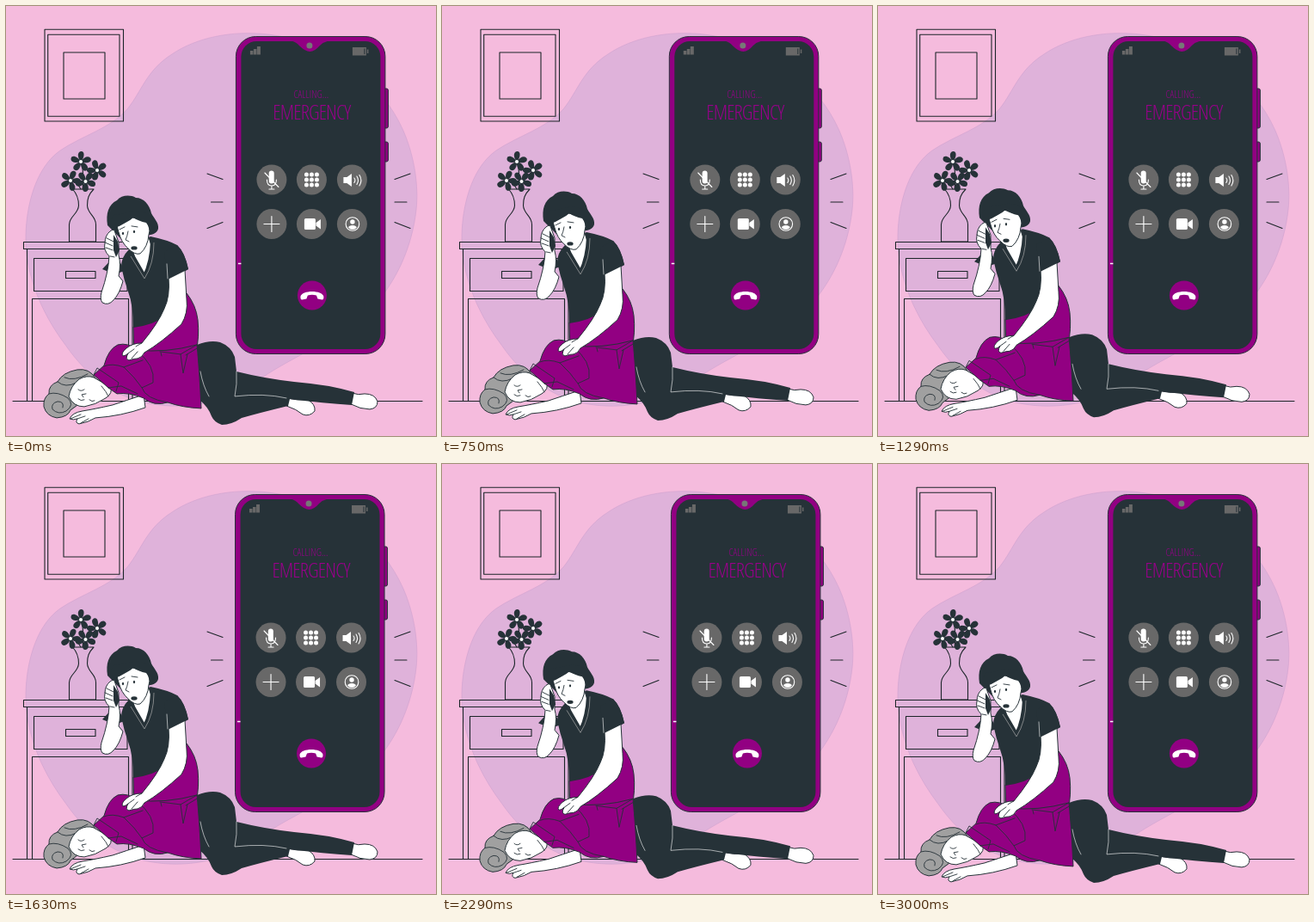
Recreate the animation shown at these times as an HTML page. Size 500x500 px, loop 3.04 s.

```html
<!DOCTYPE html>
<html lang="en">
<head>
<meta charset="utf-8">
<title>Emergency call</title>
<style>
html, body { margin: 0; width: 100%; height: 100%; overflow: hidden; background: #f5bbdd; }
svg { display: block; width: 100%; height: 100%; }
.line { fill: none; stroke: #1c2529; stroke-width: 1.1; stroke-linecap: round; stroke-linejoin: round; }
.dark { fill: #263238; }
.pink { fill: #920082; }
.grey { fill: #686868; }
.skin { fill: #fff; stroke: #263238; stroke-width: 1; stroke-linejoin: round; }
.edge { stroke: #263238; stroke-width: 1; stroke-linejoin: round; }
.fold { fill: none; stroke: #263238; stroke-width: .9; stroke-linecap: round; stroke-linejoin: round; }
.shine { fill: none; stroke: #fff; stroke-width: .6; stroke-linecap: round; }
.icon { fill: none; stroke: #fff; stroke-width: 1.1; stroke-linecap: round; }
.white { fill: #fff; }
text { fill: #98008a; font-family: "Open Sans", "Noto Sans", sans-serif; font-weight: 300; font-stretch: 75%; text-anchor: middle; }
</style>
</head>
<body>
<svg viewBox="0 0 500 500">
  <path fill="#dfb2da" stroke="#cfa2cf" stroke-width=".6" d="M23 266C24 228 36 187 63 168C88 151 122 142 141 120C158 99 163 75 193 56C221 37 262 28 305 33C380 42 438 90 462 145C475 175 480 209 477 237C472 282 453 320 430 346C395 383 345 402 304 428C272 452 235 467 190 465C137 463 98 436 69 394C39 354 22 309 23 266Z"/>

  <g class="line">
    <path d="M45 27.300H136.500V134H45ZM48.700 33.300H132V128.300H48.700ZM67 54H115V108H67Z"/>
    <path d="M20.500 274.500H147V282.500H20.500ZM24.500 282.500V459M30.500 340.500V459M30.500 340.500H142.500V459M147 282V459M32.500 293.500H141V331.500H32.500ZM69.500 308.500H104V316.500H69.500Z"/>
    <path d="M8 459.500H484"/>
    <path d="M77.500 213H102C96 219 94.500 224 94.500 232C95 242 104.500 244 104.500 254V274H73.500V254C74 244 84 242 84.500 232C84.500 224 83 219 77.500 213Z"/>
    <path d="M88 183Q91 198 89 213M106 192Q94 201 91 213M75 203Q84 206 87 213"/>
    <path d="M234 195L252 201.500M238.500 228H252M234 258.500L252 251.500M452 201.500L470 195M452 228H466M452 251.500L470 258.500"/>
  </g>
  <g id="flowers"></g>

  <g id="phone">
    <rect class="pink edge" x="438" y="96" width="6.500" height="46" rx="2"/>
    <rect class="pink edge" x="438" y="158" width="6.500" height="23" rx="2"/>
    <rect class="pink edge" x="267.500" y="35.500" width="173.500" height="369" rx="23"/>
    <rect class="dark" x="273.500" y="41" width="162" height="358" rx="18"/>
    <path class="pink" d="M332 40.500Q338 42 341 46Q348 53 353.500 53Q359 53 365 46Q369 42 375 40.500Z"/>
    <circle cx="353" cy="46" r="3.500" fill="#777"/>
    <path class="grey" d="M284 52h3.500v4.500h-3.500zM288 50h3.500v6.500h-3.500zM292 47h4v9.500h-4zM403 48h16v9.500h-16zM420 50.500h1.500v4.500h-1.500z"/>
    <path d="M417 49.500V56" stroke="#263238"/>
    <path d="M270 299.500H273.500" stroke="#fff" stroke-width="1.500"/>
    <text x="355" y="106.500" font-size="11.800" letter-spacing=".1">CALLING...</text>
    <text x="355.500" y="131.800" font-size="24" letter-spacing="-.85">EMERGENCY</text>
    <g id="buttons" class="grey"></g>

    <rect class="white" x="305.800" y="191.500" width="6" height="15" rx="3"/>
    <path class="icon" d="M303.500 202Q303.500 209 309 209Q314.500 209 314.500 202M309 209V213M306 213H312"/>
    <path class="icon" d="M301 194L317 210.500" stroke-width=".8"/>
    <g id="keypad" class="white"></g>
    <path class="white" d="M392.500 199H396.500L402 195V210L396.500 206H392.500Z"/>
    <path class="icon" d="M405 200Q407 202.500 405 205.500M408 198Q411 202.500 408 207.500M411 196.500Q415 202.500 411 209"/>
    <path class="icon" d="M300 253.500H318M309 244.500V262.500"/>
    <rect class="white" x="347" y="247" width="13" height="13" rx="1.500"/>
    <path class="white" d="M360.500 252L366 248V259.500L360.500 255.500Z"/>
    <circle class="icon" cx="403" cy="253.500" r="7.800"/>
    <circle class="white" cx="403" cy="251" r="2.700"/>
    <path class="white" d="M398 257.500Q399 255 403 255Q407 255 408 257.500Q406 260 403 260Q400 260 398 257.500Z"/>
    <circle class="pink" cx="356" cy="336.500" r="17"/>
    <path class="white" d="M342.500 338C344 330 368 330 369.500 338Q369.500 342 367.500 341.500L362.500 340.500Q361.500 337.500 361 336.500Q356 335 351 336.500Q350.500 337.500 349.500 340.500L344.500 341.500Q342.500 342 342.500 338Z"/>
  </g>

  <g id="people">
    <!-- kneeling caller -->
    <path class="pink edge" d="M148 373Q178 368 210 334Q221 348 223 365Q225 385 221 402L224 455L150 440Z"/>
    <path class="dark" d="M118 255C116 241 119 231 129 226C134 220 144 219 151 223C160 223 167 231 169 241C172 247 178 252 177 259C175 266 167 267 158 266L133 270Z"/>
    <path class="dark" d="M128 289L112 306L126 312L138 308Z"/>
    <path class="dark" d="M143 283Q134 292 134 303Q137 318 142 332Q148 348 148 374Q172 371 190 358Q204 349 210 335Q202 324 200 313L212 306Q208 286 199 278Q188 272 168 268Z"/>
    <path class="skin" d="M146 283Q151 291 148 294L161 313Q169 296 170 282L165 266L149 276Z"/>
    <path d="M146 288L161 314Q169 298 170 274" fill="none" stroke="#263238" stroke-width="4"/>
    <path d="M145 291L161 317Q172 300 172 275" fill="none" stroke="#aaa" stroke-width=".7"/>
    <path class="skin" d="M129 256L147 246L164 250Q169 257 166 266Q165 280 156 288Q150 290 142 282Q134 275 131 263Z"/>
    <path class="dark" d="M124 259Q133 256 139 252Q145 249 148 246Q154 250 163 252Q167 257 167 266Q177 261 174 251Q164 236 147 239L126 243L118 253Z"/>
    <path class="fold" d="M142 262Q141 268 139 272L143 274M132 260L138 257M146 256L153 257"/>
    <ellipse class="dark" cx="136" cy="264.500" rx="1.100" ry="1.700"/>
    <ellipse class="dark" cx="149" cy="262.500" rx="1.100" ry="1.700"/>
    <ellipse class="dark" cx="149" cy="281.500" rx="3.600" ry="2.200"/>
    <path class="skin" d="M115 276Q115 267 121 262Q126 258 127 264L131 275L131 290Q134 300 131 314L136 320Q132 335 125 342Q119 349 112 345Q109 341 111 333Q119 310 120 291Q113 284 115 276Z"/>
    <path class="dark" d="M125 266L130 274L132 284L128 292L125 284Z"/>
    <path class="fold" d="M117 270L125 274M115 275L124 279M116 281L124 284M121 291L126 292"/>

    <!-- person lying down -->
    <path class="skin" d="M402 450Q410 453 417 451Q429 451 432 460Q432 468 423 469Q412 469 401 463Z"/>
    <path class="skin" d="M326 456Q339 459 351 458Q360 463 359 471Q353 478 345 475Q338 469 326 465Z"/>
    <path class="dark" d="M222 394Q237 388 249 391Q262 396 266 408L268 425Q300 433 335 437Q374 440 405 449L402 464Q370 462 330 457L328 465Q295 473 274 479Q262 487 251 487Q242 484 239 477Q235 466 225 458Z"/>
    <path class="shine" d="M268 425Q269 440 266 454Q300 450 326 456M226 425Q229 442 236 454"/>
    <path class="skin" d="M160 452Q139 459 124 464Q102 469 89 471Q77 473 74 480Q78 482 83 480Q80 485 85 486Q96 484 104 479Q134 477 162 467Z"/>
    <path class="fold" d="M75 480L87 475M83 480L92 477M87 485L96 480"/>
    <path d="M104 433Q97 421 83 423Q66 426 60 437Q49 441 50 451Q43 456 44 466Q47 477 59 479Q72 478 75 470Q85 464 96 452Z" fill="#a0a0a0" class="edge"/>
    <path class="fold" d="M50 451Q60 448 72 456Q80 464 70 471Q61 476 54 469Q52 462 60 460Q68 460 66 467M60 437Q69 445 82 438M68 432Q79 437 95 428"/>
    <path class="skin" d="M73 454Q75 442 85 434Q94 429 102 432L121 443Q125 450 116 456Q104 464 91 466Q78 466 73 454Z"/>
    <path class="fold" d="M84 446Q87 449 91 446M84 457Q87 460 91 458M93 451L88 452L90 455M97 458Q100 461 103 459M111 442Q117 449 119 454"/>
    <path class="pink edge" d="M102 429L114 418Q119 399 130 394Q142 391 152 400Q185 404 222 394Q225 424 227 468Q205 467 188 461Q172 466 160 456Q143 449 129 451L119 444Z"/>
    <path class="fold" d="M102 429L106 421L131 438L128 448M114 419Q123 415 137 420Q150 432 158 444L171 438Q174 418 152 401M137 420L159 412M158 444Q162 457 188 461M222 394L203 405L179 402M203 405L206 427L211 405M224 397L209 406M180 403L181 407M119 444L134 442L153 451"/>

    <!-- supporting arm -->
    <path class="skin" d="M189 315Q191 338 184 352Q177 369 158 392Q147 392 140 398Q133 404 136 407Q139 407 142 404Q138 411 143 412Q149 410 153 410Q158 409 161 403Q180 392 204 370Q212 357 210 341L208 307Z"/>
    <path class="dark" d="M184 286L199 278Q208 287 212 306L188 318Z"/>
    <path class="fold" d="M142 404L149 399M146 410L153 402M158 392Q154 394 151 396"/>
    <path class="shine" d="M187 300L188 317"/>
  </g>
</svg>
<script>
const byId = id => document.getElementById(id);
const grid = (xs, ys, r) =>
  ys.flatMap(y => xs.map(x => `<circle cx="${x}" cy="${y}" r="${r}"/>`)).join("");

byId("buttons").innerHTML = grid([309, 355.5, 402.5], [202, 253.5], 17.5);
byId("keypad").innerHTML = grid([349.5, 355.5, 361.5], [196, 202, 208], 2.5);

const petal = angle =>
  `<path class="dark" transform="rotate(${angle})" d="M0 0C-5 -5 -5 -11 -1 -12C4 -13 4 -5 0 0Z"/>`;
const flower = ([x, y, turn]) => `<g transform="translate(${x} ${y})">
  ${[0, 72, 144, 216, 288].map(a => petal(a + turn)).join("")}<circle class="white" r="2"/></g>`;
byId("flowers").innerHTML =
  [[87, 181, 5], [106, 191, -15], [75, 203, 25], [92.5, 204, 40]].map(flower).join("");

const LOOP = 3040, SHAKE = 1500, FLOAT = 3000, LEAD = 14;
const shakeStops = [0, -1, 2, -4, 4, -4, 4, -4, 2, -1, 0];

function shakeAt(t) {
  const pos = (t % SHAKE) / SHAKE * 10, i = Math.floor(pos);
  return shakeStops[i] + (shakeStops[i + 1] - shakeStops[i]) * (pos - i);
}

function floatAt(t) {
  const p = (t % FLOAT) / FLOAT;
  return -10 * (1 - Math.abs(1 - 2 * p));
}

function draw(now) {
  const t = now % LOOP + LEAD;
  byId("phone").setAttribute("transform", `translate(${shakeAt(t).toFixed(3)} 0)`);
  byId("people").setAttribute("transform", `translate(0 ${floatAt(t).toFixed(3)})`);
}

const start = performance.now();
function tick() {
  draw(performance.now() - start);
  requestAnimationFrame(tick);
}
draw(0);
tick();
</script>
</body>
</html>
```
